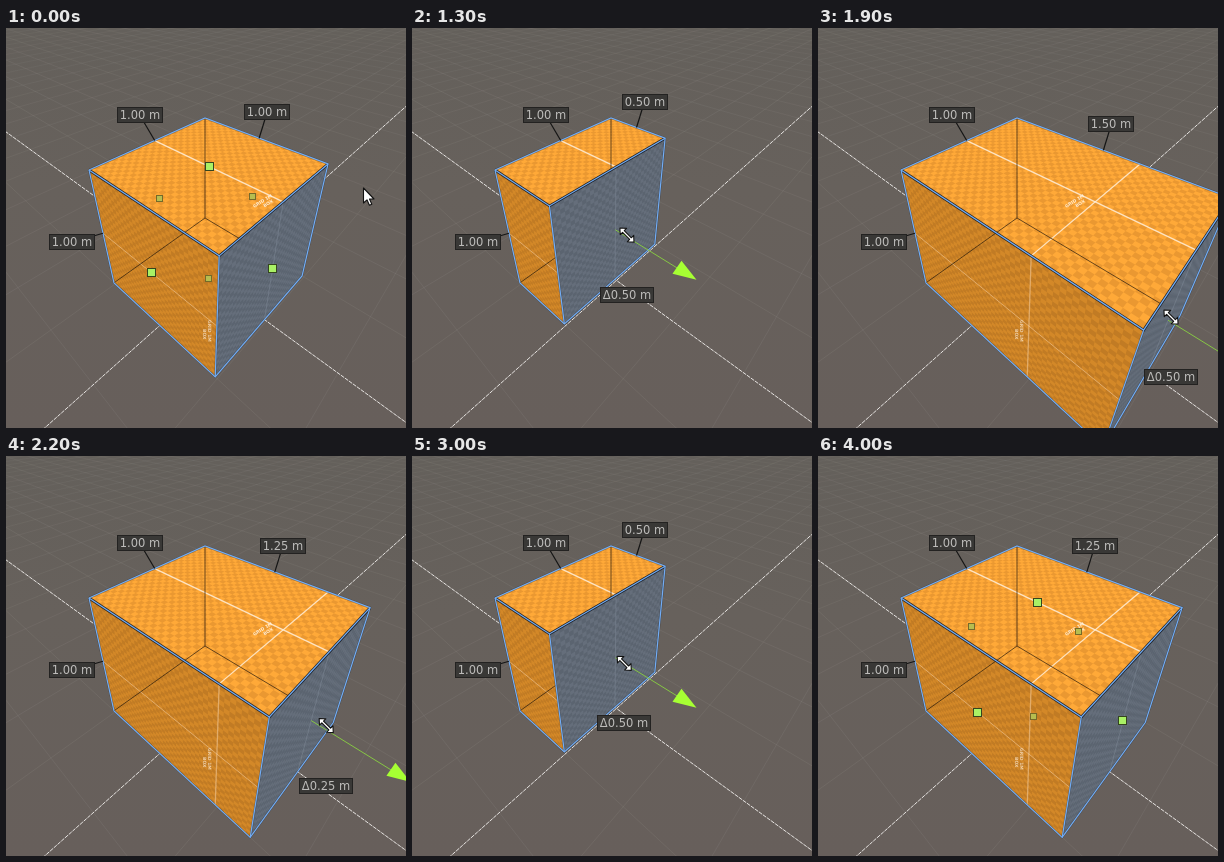
Write an HTML page with a canvas that moves like this. It is 400 by 400 pixels and loops after 4500 ms.

```html
<!DOCTYPE html>
<html lang="en">
<head>
<meta charset="utf-8">
<title>Resizing a box</title>
<style>
html, body { margin: 0; width: 100%; height: 100%; overflow: hidden; background: #675f5b; }
canvas { display: block; width: 400px; height: 400px; }
</style>
</head>
<body>
<canvas id="stage" width="400" height="400"></canvas>
<script>
const g = document.getElementById('stage').getContext('2d');
const LOOP = 4500, STEP = 100;

const smooth = t => t * t * (3 - 2 * t);
const push = t => t ** 1.3;
const pull = t => 1 - (1 - t) ** 1.6;

// Pointer moves between a few rest points
const start = [357, 159], grip = [267, 241], inner = [203, 200];
const outer = [353, 289], drop = [298, 275], away = [440, 405];
const moves = [
  { from: 0, to: 5, a: start, b: grip, ease: smooth },
  { from: 6, to: 11, a: grip, b: inner, ease: pull },
  { from: 12, to: 19, a: inner, b: outer, ease: push },
  { from: 21, to: 28, a: outer, b: inner, ease: pull },
  { from: 29, to: 35, a: inner, b: drop, ease: push },
  { from: 35, to: 40, a: drop, b: away, ease: push }
];
function pointerAt(step) {
  const m = moves.filter(m => m.from <= step).pop();
  const k = m.ease(Math.min(1, (step - m.from) / (m.to - m.from)));
  return m.a.map((v, i) => v + (m.b[i] - v) * k);
}

// x runs to the right, y to the left, z down
function depth(x, y, z) { return 1 - .215 * x - .2345 * y + .21 * z; }
function P(x, y, z) {
  const w = depth(x, y, z);
  return [199 + (96.6 * x - 88.8 * y) / w, 90 + (36.1 * x + 39.8 * y + 121 * z) / w];
}

function trace(points, close) {
  points.forEach((p, i) => i ? g.lineTo(p[0], p[1]) : g.moveTo(p[0], p[1]));
  if (close) g.closePath();
}
function line(points, color, width = 1) {
  g.beginPath();
  trace(points);
  g.strokeStyle = color;
  g.lineWidth = width;
  g.stroke();
}
function poly(points, fill) {
  g.beginPath();
  trace(points, true);
  g.fillStyle = fill;
  g.fill();
}

function floorLine(offset, alongX, color) {
  const point = s => alongX ? [s, .5 + offset, 1] : [.515 + offset, s, 1];
  const near = (depth(...point(0)) - .08) / (alongX ? .215 : .2345);
  if (near > -30) line([P(...point(-30)), P(...point(near))], color);
}
function drawFloor() {
  const bg = g.createLinearGradient(0, 0, 0, 400);
  bg.addColorStop(0, '#64605b');
  bg.addColorStop(.4, '#67615c');
  bg.addColorStop(1, '#675f5b');
  g.fillStyle = bg;
  g.fillRect(0, 0, 400, 400);
  for (const alongX of [true, false]) {
    for (let n = -36; n <= 10; n++) {
      const alpha = .1 / (1 + Math.abs(n) * .05);
      if (n) floorLine(n / 2, alongX, `rgba(190,185,182,${alpha})`);
    }
    g.setLineDash([4, 1]);
    floorLine(0, alongX, 'rgba(244,242,240,.9)');
    g.setLineDash([]);
  }
}

function face(corners, fill, map, length, dots) {
  const n = 32;
  poly(corners, fill);
  g.beginPath();
  for (let i = 0; i < length * n; i++)
    for (let j = i % 2; j < n; j += 2) {
      const a = i / n, b = j / n, c = (i + 1) / n, d = (j + 1) / n;
      trace([map(a, b), map(c, b), map(c, d), map(a, d)], true);
    }
  g.fillStyle = dots;
  g.fill();
}
function mark(at, angle, alpha) {
  g.save();
  g.translate(...at);
  g.rotate(angle);
  g.fillStyle = `rgba(255,245,230,${alpha})`;
  g.textAlign = 'left';
  g.font = 'bold 4.5px "DejaVu Sans", sans-serif';
  g.fillText('GRID 1M', 0, 0);
  g.fillText('BOX', 9, 5);
  g.restore();
}

function drawBox(L) {
  const B = P(0, 0, 0), A = P(0, 1, 0), R = P(L, 0, 0), F = P(L, 1, 0);
  const b = P(0, 0, 1), a = P(0, 1, 1), r = P(L, 0, 1), f = P(L, 1, 1);
  const topLine = 'rgba(255,240,220,.85)', sideLine = 'rgba(255,225,190,.45)';

  face([A, F, f, a], '#d38828', (u, v) => P(u, 1, v), L, 'rgba(140,85,25,.26)');
  line([P(0, 1, .5), P(L, 1, .5)], sideLine);
  face([B, R, F, A], '#ffa938', (u, v) => P(u, v, 0), L, 'rgba(185,112,35,.3)');
  line([P(0, .5, 0), P(L, .5, 0)], topLine, 1.3);
  if (L >= 1) {
    mark(P(.92, .64, 0), -.55, .9);
    mark(P(.94, 1, .51), Math.PI / 2, .65);
  }
  if (L > 1) {
    line([P(1, 0, 0), P(1, 1, 0)], topLine, 1.3);
    line([P(1, 1, 0), P(1, 1, 1)], sideLine, 1.3);
  }

  line([B, b, a], 'rgba(25,18,10,.65)');
  line([b, r], 'rgba(25,18,10,.65)');

  face([R, F, f, r], '#5b6470', (u, v) => P(L, u, v), 1, 'rgba(135,145,160,.22)');
  line([P(L, .5, 0), P(L, .5, 1)], 'rgba(160,172,188,.25)');

  const rim = [A, F, R], edges = [[A, B, R, r, f, a, A], rim, [F, f]];
  line(rim, 'rgba(20,25,35,.8)', 2.8);
  edges.forEach(e => line(e, 'rgba(20,25,35,.4)', 2));
  edges.forEach(e => line(e, '#72adf5', 1.2));
}

function label(text, x, y) {
  x = Math.round(x);
  y = Math.round(y);
  const w = text.length > 6 ? 54 : 46;
  g.fillStyle = '#393836';
  g.fillRect(x - w / 2, y - 8, w, 16);
  g.strokeStyle = '#232221';
  g.lineWidth = 1;
  g.strokeRect(x - w / 2 + .5, y - 7.5, w - 1, 15);
  g.fillStyle = '#bdbcba';
  g.font = '11.5px "DejaVu Sans", sans-serif';
  g.textAlign = 'center';
  g.fillText(text, x, y + 4);
}
function sizeLabel(value, at, dx, dy) {
  const x = at[0] + dx, y = at[1] + dy;
  line([at, [x, y]], '#151515', 1.2);
  label(value.toFixed(2) + ' m', x, y);
}

function handle(p, front) {
  const s = front ? 8 : 6, x = Math.round(p[0]) - s / 2, y = Math.round(p[1]) - s / 2;
  g.fillStyle = front ? '#a9f165' : '#b6bd50';
  g.fillRect(x, y, s, s);
  g.strokeStyle = front ? '#35451f' : '#746a2a';
  g.lineWidth = 1;
  g.strokeRect(x - .5, y - .5, s, s);
}
function drawHandles(L, hover) {
  const m = L / 2;
  handle(P(0, .5, .5));
  handle(P(m, 0, .5));
  handle(P(m, .5, 1));
  handle(P(m, .5, 0), true);
  handle(P(m, 1, .5), true);
  if (!hover) handle(P(L, .5, .5), true);
}

function drawAxis(L) {
  const [x, y] = P(L + .705 * depth(L, .5, .5), .5, .5);
  line([P(L, .5, .5), [x - 18, y - 11]], '#86c644');
  poly([[x, y], [x - 15, y - 19], [x - 24, y - 6]], '#a6ff33');
}

function drawPointer(x, y, resize) {
  const half = [[-10, 0], [-5, -4.5], [-5, -1.2], [5, -1.2], [5, -4.5], [10, 0]];
  const arrow = [[.5, 1], [.5, 16], [4, 12.8], [6.4, 18.3], [8.8, 17.2], [6.5, 12], [11, 12]];
  const both = half.concat(half.slice(1, 5).reverse().map(p => [p[0], -p[1]]));
  g.save();
  g.translate(x, y);
  if (resize) g.rotate(Math.PI / 4);
  g.lineJoin = 'round';
  poly(resize ? both : arrow, '#fff');
  g.strokeStyle = '#111';
  g.lineWidth = 1.1;
  g.stroke();
  g.restore();
}

// Box length under the pointer, snapped to quarters
function snap(x) {
  const d = x - 199;
  return Math.round((44.4 + .988 * d) / (96.6 + .215 * d) * 4) / 4;
}

function draw(time) {
  const step = Math.floor(time / STEP);
  const [x, y] = pointerAt(step);
  const drag = step >= 7 && step < 36;
  const hover = step >= 4 && step < 37;
  const L = drag ? snap(x) : step < 7 ? 1 : 1.25;

  drawFloor();
  drawBox(L);
  sizeLabel(1, P(0, .5, 0), -15, -25.5);
  sizeLabel(L, P(L / 2, 0, 0), 8, -26);
  sizeLabel(1, P(0, 1, .5), -31, 9);
  if (!drag) drawHandles(L, hover);
  if (hover) drawAxis(L);
  if (drag) label('Δ' + Math.abs(L - 1).toFixed(2) + ' m', x, y + 60);
  drawPointer(x, y, hover);
}

const begin = performance.now();
function tick() {
  draw((performance.now() - begin) % LOOP);
  requestAnimationFrame(tick);
}
tick();
</script>
</body>
</html>
```
